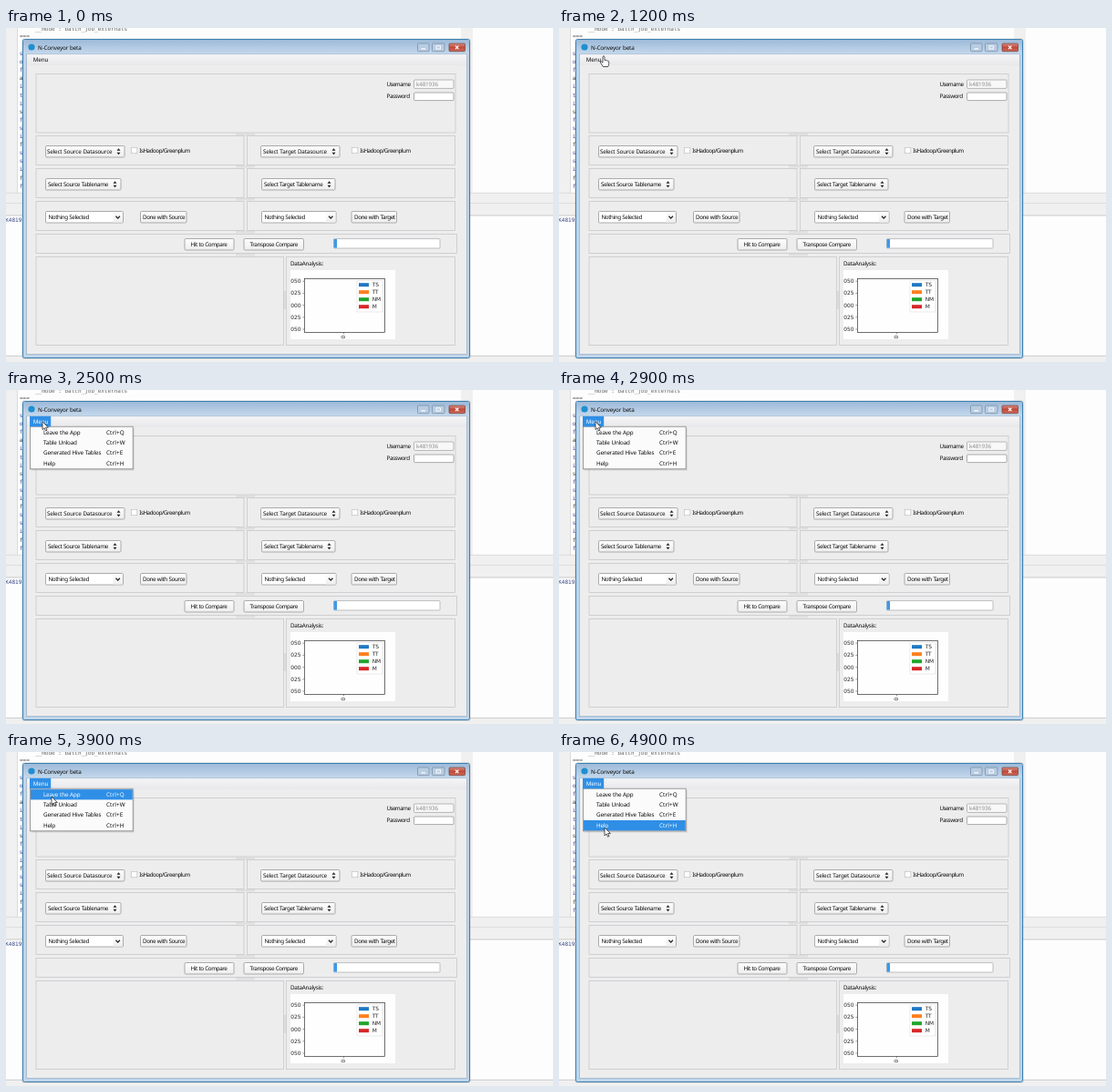
An HTML page for the animation above (5 s loop, 600 px wide and 367 px high).

```html
<!DOCTYPE html>
<html lang="en">
<head>
<meta charset="utf-8">
<title>Menu demo</title>
<style>
html, body { margin: 0; width: 100%; height: 100%; overflow: hidden; background: #fff; }
svg { display: block; width: 100vw; height: 100vh; }
text {
  font-family: "Noto Sans", "Open Sans", sans-serif; font-size: 6.3px;
  word-spacing: .4px; white-space: pre; text-rendering: geometricPrecision;
}
.mono { font-family: "DejaVu Sans Mono", monospace; font-size: 6px; word-spacing: 0; }
.plot { font-family: "DejaVu Sans", sans-serif; font-size: 5.9px; }
</style>
</head>
<body>
<svg id="stage" viewBox="0 0 600 367" preserveAspectRatio="none">
  <defs>
    <linearGradient id="bar" x2="0" y2="1">
      <stop stop-color="#9dbad9"/><stop offset="1" stop-color="#c6d9ec"/>
    </linearGradient>
    <linearGradient id="strip" x2="0" y2="1">
      <stop stop-color="#f5f5f7"/><stop offset="1" stop-color="#e8e8ea"/>
    </linearGradient>
    <linearGradient id="btn" x2="0" y2="1">
      <stop stop-color="#fdfdfd"/><stop offset="1" stop-color="#eeeeee"/>
    </linearGradient>
    <linearGradient id="red" x2="0" y2="1">
      <stop stop-color="#d98c80"/><stop offset=".5" stop-color="#c04a3a"/><stop offset="1" stop-color="#cc6a58"/>
    </linearGradient>
  </defs>
  <g id="desk"></g>
  <g id="app"></g>
  <g id="menu"></g>
  <g id="cursor">
    <path id="arrow" d="M0 0V8.9L2.1 7L3.5 10.2L5 9.5L3.6 6.5H6.4Z" fill="#fff" stroke="#222" stroke-width=".75"/>
    <path id="hand" d="M-1 1Q0-.7 1 1V5Q2 4 2.8 5.2Q3.8 4.6 4.4 5.7Q5.6 5.4 5.7 6.8V9Q5.5 10.5 4.7 12H-.7Q-1.5 10-3.5 7.8Q-3.8 6-2.2 6.5L-1 7.7Z" fill="#fff" stroke="#222" stroke-width=".75"/>
  </g>
</svg>
<script>
const $ = id => document.getElementById(id);
const SVG = 'http://www.w3.org/2000/svg';
const INK = '#0c0c0c';
let layer;

function el(tag, attrs) {
  const node = document.createElementNS(SVG, tag);
  for (const k in attrs) node.setAttribute(k, attrs[k]);
  layer.append(node);
  return node;
}
// Box given by its left, top, right and bottom edges
const box = (l, t, r, b, fill, stroke = 'none', rx = 0, sw = .8) =>
  el('rect', { x: l, y: t, width: r - l, height: b - t, fill, stroke, rx, 'stroke-width': sw });
const line = (d, stroke, sw = .8) => el('path', { d, stroke, fill: 'none', 'stroke-width': sw });
function text(x, y, str, gap = -.42, fill = INK, cls = '') {
  const node = el('text', { x, y, fill, class: cls, 'letter-spacing': gap });
  node.textContent = str;
  return node;
}
const panel = (l, t, r, b) => box(l, t, r, b, '#ededee', '#c9c9cb');
function button(l, t, r, b, x, str, gap) {
  box(l, t, r, b, 'url(#btn)', '#999', 1.3);
  text(x, b - 4.5, str, gap);
}
function picker(l, t, r, b, x, str, gap) {
  button(l, t, r, b, x, str, gap);
  const c = r - 6.5, m = (t + b) / 2;
  el('path', { d: `M${c - 2} ${m - 1}h4l-2-2.6zM${c - 2} ${m + 1}h4l-2 2.6z`, fill: '#222' });
}
function dropdown(l, t, r, b) {
  box(l, t, r, b, '#fff', '#999', 1);
  box(r - 11, t + .5, r - .5, b - .5, 'url(#btn)');
  text(l + 3, b - 4.5, 'Nothing Selected');
  line(`M${r - 8} ${t + 5.2}l2.2 2.4l2.2-2.4`, '#222', 1.3);
}
function check(x) {
  box(x, 131.3, x + 6.5, 137.7, '#fff', '#c0c0c0', 0, .7);
  text(x + 9, 136.7, 'IsHadoop/Greenplum', -.5);
}

function drawDesk() {
  layer = $('desk');
  box(0, 0, 600, 367, '#fdfdfe');
  box(0, 0, 12, 181, '#f0f0f0');
  line('M12.5 0V181', '#d2d2d2');
  box(499, 0, 512, 181, '#f0f0f0');
  box(0, 181, 600, 206, '#f0f0f0');
  line('M0 181.4H600M0 192.5H600', '#d8d8d8');
  line('M0 206H600', '#bdbdbd');
  box(0, 360, 600, 367, '#f0f0f0');
  line('M0 360.3H600', '#c4c4c4');
  text(32, 3, '__mode : batch_job_externals', 0, '#666', 'mono');
  text(15, 11, '===', 0, '#555', 'mono');
  [...'sofaitisfsifssiff'].forEach((c, i) =>
    text(14.8, 30 + i * 9.1, c, 0, i % 4 == 3 ? '#444' : '#3a4c9c', 'mono'));
  text(-.8, 213.3, 'K4819', 0, '#34427f', 'mono');
}

function drawFrame() {
  layer = $('app');
  box(17.2, 11.2, 510, 364, '#00000018', 'none', 3);
  box(18.5, 12.5, 508.5, 362.5, '#bfd5ea', '#3a80b0', 2, 1);
  box(19, 13, 508, 29, 'url(#bar)', 'none', 1.5);
  box(22.5, 29, 505.5, 358.5, '#ededee', '#8ea6bd', 0, .6);
  box(23, 29.2, 505, 41, 'url(#strip)');
  el('circle', { cx: 28, cy: 21, r: 3.6, fill: '#1f8fd0' });
  text(35, 23.6, 'N-Conveyor beta', -.16);
  box(451.5, 17, 464, 25.7, '#b9cde2', '#71879f', 1, .7);
  box(467.5, 17, 481, 25.7, '#b9cde2', '#71879f', 1, .7);
  box(486, 17, 503.5, 25.7, 'url(#red)', '#74403c', 1, .7);
  line('M455.5 22.8H460', '#fff', 1.2);
  box(472, 19.8, 476.4, 23, 'none', '#fff', 0, .9);
  line('M493 19.7l3.4 3.4m0-3.4l-3.4 3.4', '#fff', 1.2);
  text(29.8, 36.6, 'Menu', -.16);
}

function drawForm() {
  for (const y of [115.5, 150.5, 186.5, 222.5, 247.5]) box(252, y, 273, y + 3, '#dfdfdf');
  box(304.5, 289, 307, 309, '#dcdcdc');
  panel(33, 50.4, 493, 115);
  for (const y of [118.4, 154.4, 190.4]) {
    panel(33, y, 261, y + 32);
    panel(264.5, y, 492.5, y + 32);
  }
  panel(33, 226.4, 494.5, 247.4);
  panel(33, 251.4, 304.4, 348.4);
  panel(307.5, 251.4, 492.5, 348.4);

  text(417.5, 63.5, 'Username', -.6);
  text(417.5, 77.4, 'Password', -.42);
  box(447.5, 57, 491, 66.4, '#f8f8f8', '#a8a8a8', 1);
  box(447.5, 71, 491, 79.6, '#fff', '#999', 1);
  text(450, 63.6, 'k481936', -.16, '#8a8a8a');

  picker(43.5, 129.5, 130, 142, 45, 'Select Source Datasource', -.17);
  picker(279.5, 129.5, 366, 142, 282, 'Select Target Datasource', -.17);
  picker(43.5, 165.5, 126, 178, 46, 'Select Source Tablename', -.36);
  picker(280.5, 165.5, 361, 178, 283, 'Select Target Tablename', -.36);
  check(137.3);
  check(379.3);
  dropdown(43.5, 201.5, 128.5, 214);
  dropdown(280.5, 201.5, 362, 214);
  button(147.5, 201.5, 198, 214, 150, 'Done with Source');
  button(379, 201.5, 428.5, 214, 382, 'Done with Target');
  button(196, 231.5, 250, 244, 202.5, 'Hit to Compare');
  button(261, 231.5, 326.5, 244, 267.5, 'Transpose Compare');
  box(359.5, 231.6, 476, 242, '#fff', '#b0b0b0', .8);
  box(359.6, 232, 363, 241.6, '#3e98e8');
}

function drawPlot() {
  text(312, 261.4, 'DataAnalysis:', -.28);
  box(312, 266, 427, 342, '#fefefe');
  box(327.5, 275.5, 415.5, 334.5, 'none', '#333', 0, .7);
  ['050', '025', '000', '025', '050'].forEach((s, i) => {
    const y = 278.2 + i * 13.2;
    text(312.3, y + 1.9, s, 0, '#222', 'plot');
    line(`M325.4 ${y}H327.4`, '#555', .6);
  });
  line('M370.5 334.4V336.4', '#555', .6);
  text(372.5, 341.6, '0', 0, '#222', 'plot').setAttribute('transform', 'rotate(-90 372.5 341.6)');
  box(385, 277.5, 413, 312, '#fff', '#dadada', 1, .6);
  [['TS', '#1f77c4'], ['TT', '#ff7f1e'], ['NM', '#20a52c'], ['M', '#d62728']].forEach(([s, c], i) => {
    box(387, 280.2 + i * 8, 398, 284.2 + i * 8, c);
    text(401.7, 284.2 + i * 8, s, -.1, '#222', 'plot');
  });
}

const TOP = 41.1, ROW = 11.3, BLUE = '#2f8fe6';
let bar, rows;
function drawMenu() {
  layer = $('menu');
  box(27.5, 42, 140.6, 88.4, '#00000022');
  box(26.4, 40.2, 139.2, 86.8, '#fbfbfb', '#858585');
  box(26, 28.8, 49.2, 40.2, BLUE);
  text(29.8, 36.6, 'Menu', -.16, '#fff');
  bar = box(27, TOP, 138.8, TOP + ROW, BLUE);
  rows = [['Leave the App', 'Q'], ['Table Unload', 'W'], ['Generated Hive Tables', 'E'], ['Help', 'H']]
    .map(([name, key], i) => {
      const y = TOP + 7.6 + i * ROW;
      return [text(41, y, name, -.18), text(110, y, 'Ctrl+' + key, .13)];
    });
}

// Pointer path: time, x, y
const path = [
  [700, 72, -13], [1200, 49, 30.5], [1300, 48, 31], [1900, 40, 34.7], [2900, 40, 34.7],
  [3200, 44, 41.5], [3300, 44, 41.5], [3900, 50, 49], [4000, 50, 49],
  [4400, 53, 67], [4500, 53, 68], [4600, 53, 68], [4900, 50, 83], [5000, 50, 83]
];
function pointer(t) {
  const i = Math.max(1, path.findIndex(p => p[0] >= t));
  const [t0, x0, y0] = path[i - 1], [t1, x1, y1] = path[i];
  const u = Math.max(0, (t - t0) / (t1 - t0)), e = u * u * (3 - 2 * u);
  return [x0 + (x1 - x0) * e, y0 + (y1 - y0) * e];
}
const show = (node, on) => node.setAttribute('display', on ? 'inline' : 'none');

function render(ms) {
  const t = Math.floor(ms % 5000 / 100) * 100;
  const [x, y] = pointer(t);
  const open = t >= 2400, hand = t < 1400;
  show($('cursor'), t >= 800);
  $('cursor').setAttribute('transform', `translate(${x} ${y})`);
  show($('hand'), hand);
  show($('arrow'), !hand);
  show($('menu'), open);
  const row = Math.floor((y - TOP) / ROW);
  show(bar, open && row >= 0);
  bar.setAttribute('y', TOP + row * ROW);
  rows.forEach((pair, i) => pair.forEach(n => n.setAttribute('fill', i == row ? '#fff' : INK)));
}

drawDesk();
drawFrame();
drawForm();
drawPlot();
drawMenu();
const start = performance.now();
function tick() {
  render(performance.now() - start);
  requestAnimationFrame(tick);
}
tick();
</script>
</body>
</html>
```
